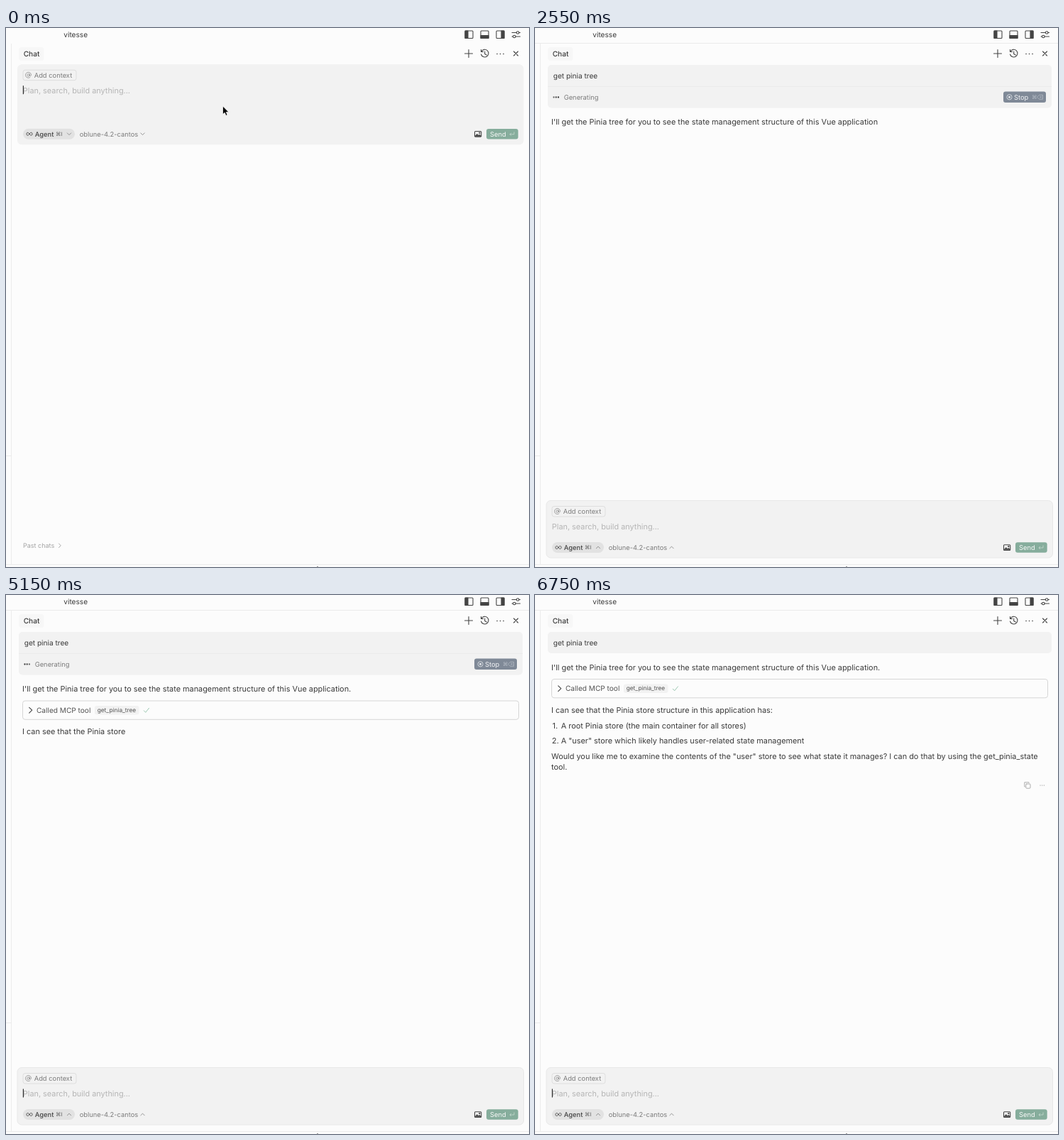
An HTML page for the animation above (7.1 s loop, 737x759 px).

```html
<!DOCTYPE html>
<html lang="en">
<head>
<meta charset="utf-8">
<title>Chat panel</title>
<style>
  html, body { margin: 0; width: 100%; height: 100%; overflow: hidden; background: #fcfcfc; }
  svg { display: block; width: 737px; height: 759px; }
  text { font-family: Inter, Roboto, sans-serif; font-size: 10.89px; fill: #3a3a3a; white-space: pre; text-rendering: geometricPrecision; }
  .mid { font-size: 10.1px; }
  .small { font-size: 9.35px; fill: #7c7c7c; }
  .medium { font-weight: 500; }
  .key { font-family: "DejaVu Sans", sans-serif; font-size: 7.5px; }
  .icon { fill: none; stroke: #444; stroke-width: 1.1; stroke-linecap: round; stroke-linejoin: round; }
  .solid { fill: #444; }
  .line { stroke: #ebebeb; fill: none; }
  .panel { fill: #f2f2f2; }
  .soft { stroke: #8c8c8c; }
</style>
</head>
<body>
<svg viewBox="0 0 737 759">
  <defs>
    <path id="chevron" d="M-2.7-1.3 0 1.4 2.7-1.3"/>
    <path id="return" d="M3-3v3.5H-3m2-2-2 2 2 2"/>
  </defs>
  <rect width="737" height="759" fill="#fcfcfc"/>

  <!-- window chrome -->
  <path class="line" d="M7.5 22V755M0 602.5H7.5M0 755.5H737"/>
  <path id="topLine" class="line" d="M0 21.5H737"/>
  <path d="M438 759h2" stroke="#777" stroke-width="1.5"/>
  <text class="mid" x="81.3" y="13">vitesse</text>
  <g class="icon">
    <rect x="647" y="4" width="11" height="10.5" rx="1"/>
    <path class="solid" d="M647 4h4v10.5h-4z"/>
    <rect x="669" y="4" width="11" height="10.5" rx="1"/>
    <path class="solid" d="M669 10.5h11v4h-11z"/>
    <rect x="691" y="4" width="11" height="10.5" rx="1"/>
    <path class="solid" d="M698 4h4v10.5h-4z"/>
    <path d="M713 6.500h6.500M723 6.500h1.500M713 12h1.500M718 12h6.500"/>
    <circle cx="721.2" cy="6.500" r="1.8"/>
    <circle cx="716.3" cy="12" r="1.8"/>
  </g>
  <rect x="18" y="27" width="35.5" height="19" rx="4" fill="#f7f7f7"/>
  <text class="mid medium" x="24.7" y="39.6">Chat</text>
  <g class="icon">
    <path d="M646.5 36h11M652 30.5v11"/>
    <path d="M670 33a5.3 5.3 0 1 1-.5 4M669.5 30.5V33.5h3M674.7 33v3.5l2.500 1.500"/>
    <path d="M715.5 33l6 6M721.5 33l-6 6"/>
    <path d="M692 36.5h.1M696.5 36.5h.1M701 36.5h.1" stroke-width="1.6"/>
  </g>

  <!-- conversation -->
  <g id="message">
    <rect id="bubble" class="panel" x="18" y="52" width="710" height="60.5" rx="5"/>
    <text class="mid" x="25.7" y="71.2">get pinia tree</text>
    <g id="status">
      <path class="line" d="M18 82.5H728"/>
      <g id="dots" fill="#333">
        <circle cx="26.5" cy="97.5" r="1.15"/>
        <circle cx="29.7" cy="97.5" r="1.15"/>
        <circle cx="32.9" cy="97.5" r="1.15"/>
      </g>
      <text class="small" x="40.7" y="101">Generating</text>
      <rect x="660" y="89.500" width="60" height="15.500" rx="3" fill="#7f8997"/>
      <circle cx="668.5" cy="97.3" r="3.6" fill="none" stroke="#e4e7eb" stroke-width=".8"/>
      <rect x="667.2" y="96" width="2.6" height="2.6" fill="#e4e7eb"/>
      <text class="small" x="675" y="100.9" style="fill:#f3f4f6">Stop</text>
      <text class="key" x="700" y="100" style="fill:#b4bbc5">⌘</text>
      <path d="M710.5 94.3h5v6h-5l-3-3zM711.3 96l2.6 2.6m0-2.6-2.6 2.6" fill="none" stroke="#b4bbc5" stroke-width=".8"/>
    </g>
  </g>
  <g id="reply">
    <text id="intro" x="23" y="136"></text>
    <g id="tool">
      <rect x="23.5" y="149" width="699" height="26.3" rx="3.5" fill="none" stroke="#d6d6d6"/>
      <path class="icon" d="M32.7 158.3l4 3.900-4 3.900"/>
      <text class="mid" x="43" y="165.8" style="fill:#555">Called MCP tool</text>
      <rect x="125" y="156" width="62.5" height="12.5" rx="3" fill="#f2f2f2"/>
      <text x="128.7" y="164.8" style="font-size:8.3px;fill:#555">get_pinia_tree</text>
      <path id="check" d="M194 162.5l2.700 2.800 5-6.300" fill="none" stroke="#9cc8b2" stroke-width="1"/>
    </g>
    <circle id="wait" cx="25" cy="200" r=".7" fill="#aaa"/>
    <g id="lines">
      <text x="23" y="196"></text>
      <text x="36.7" y="218"></text>
      <text x="36.7" y="239"></text>
      <text x="23" y="261"></text>
      <text x="23" y="276.7"></text>
    </g>
    <text id="one" x="24.5" y="218">1.</text>
    <text id="two" x="23.8" y="239">2.</text>
    <g id="actions" class="icon" style="stroke:#a5a5a5;stroke-width:.9">
      <rect x="691.8" y="296.5" width="6.200" height="6.200" rx="1"/>
      <path d="M690.5 300.5h-.7v-6.200h6.200v.7"/>
      <path d="M712 298.5h.1M714.7 298.5h.1M717.4 298.5h.1" stroke="#8c8c8c" style="stroke-width:1.2"/>
    </g>
  </g>

  <!-- composer -->
  <g id="composer">
    <rect id="box" class="panel" x="16" y="0" width="713.5" rx="6"/>
    <rect x="24" y="8" width="75" height="14.5" rx="3" fill="none" stroke="#dedede"/>
    <g class="icon soft" style="stroke-width:.8">
      <circle cx="31.5" cy="15.2" r="1.7"/>
      <path d="M33.2 13.5v2.300q1.500 1.800 2.300-.6a4 4 0 1 0-1.700 3.200"/>
    </g>
    <text class="small" x="39.7" y="18.7">Add context</text>
    <text id="hint" x="23.8" y="40.4" style="fill:#b5b5b5">Plan, search, build anything...</text>
    <text id="draft" x="23.8" y="40.4">get pinia tree</text>
    <rect id="caret" x="24" y="30" width="1.2" height="12" fill="#333"/>
    <g id="toolbar">
      <rect x="24" y="-7.5" width="73" height="15" rx="7.5" fill="#e2e2e2"/>
      <path d="M33 0c-1.500-2.700-4-2.600-4 0s2.500 2.700 4 0 4-2.600 4 0-2.500 2.700-4 0z" class="icon" style="stroke-width:.9"/>
      <text class="small medium" x="40.7" y="3.4" style="fill:#444">Agent</text>
      <text class="key" x="70" y="2.8" style="fill:#666">⌘I</text>
      <text class="small" x="103.7" y="3.4">oblune-4.2-cantos</text>
      <g id="chevrons" class="icon soft" style="stroke-width:.9">
        <use href="#chevron" x="89"/>
        <use href="#chevron" x="192.5"/>
      </g>
      <g class="icon">
        <rect x="660.5" y="-3.7" width="9.2" height="7.600" rx="1"/>
        <path class="solid" d="M661 3l2.800-3 2 2 1.500-1.300 2.200 2.300z" stroke-width=".7"/>
        <circle cx="667.3" cy="-1.5" r=".6"/>
      </g>
      <g id="send">
        <rect x="677" y="-7.2" width="44.7" height="14.4" rx="3" fill="#1c6b48"/>
        <text class="small" x="682" y="3.4" style="fill:#fff">Send</text>
        <use href="#return" x="713" y="0" fill="none" stroke="#fff" stroke-width=".8" opacity=".55"/>
      </g>
    </g>
  </g>
  <g id="past">
    <text x="24" y="732" style="font-size:9px;fill:#a3a3a3">Past chats</text>
    <path class="icon" style="stroke:#a3a3a3;stroke-width:.9" d="M74.5 726l2.700 2.800-2.700 2.800"/>
  </g>

  <path id="pointer" d="M0 0V11.600L2.700 9.200 4.500 13.300 6.500 12.400 4.700 8.400H8.300Z" stroke="#fff" stroke-width=".7"/>
</svg>

<script>
const LOOP = 7100, STEP = 50;
const PASTE = 550, SUBMIT = 750, DONE = 6600;
const el = {};
document.querySelectorAll("[id]").forEach(node => el[node.id] = node);

const intro = "I'll get the Pinia tree for you to see the state management structure of this Vue application";
const answer = [
  "I can see that the Pinia store structure in this application has:",
  "A root Pinia store (the main container for all stores)",
  'A "user" store which likely handles user-related state management',
  'Would you like me to examine the contents of the "user" store to see what state it manages? ' +
    "I can do that by using the get_pinia_state",
  "tool."
].join("\n");
const tokenize = text => text.match(/\s*[^\s_]+_?/g);
const introTokens = tokenize(intro);
const answerTokens = tokenize(answer);

// Piecewise linear value through [time, value] points.
function track(t, points) {
  if (t <= points[0][0]) return points[0][1];
  for (let i = 1; i < points.length; i++) {
    const [t0, v0] = points[i - 1], [t1, v1] = points[i];
    if (t <= t1) return v0 + (v1 - v0) * (t - t0) / (t1 - t0);
  }
  return points[points.length - 1][1];
}
const show = (node, on) => node.style.display = on ? "" : "none";
const move = (node, x, y) => node.setAttribute("transform", `translate(${x} ${y})`);
const take = (tokens, count) => tokens.slice(0, Math.floor(count + 1e-6)).join("");

function drawComposer(t) {
  const sent = t >= SUBMIT, typed = t >= PASTE && !sent;
  move(el.composer, 0, sent ? 665.5 : 51.2);
  move(el.toolbar, 0, sent ? 66 : 98);
  el.box.setAttribute("height", sent ? 80.5 : 113);
  el.box.setAttribute("stroke", sent ? "#e8e8e8" : "none");
  el.chevrons.setAttribute("transform", sent ? "scale(1 -1)" : "");
  el.send.setAttribute("opacity", typed ? 1 : 0.5);
  show(el.hint, !typed);
  show(el.draft, typed);
  show(el.past, !sent);
  show(el.caret, sent ? (t - SUBMIT) % 1000 < 500 : t < 50 || typed);
  el.caret.setAttribute("x", typed ? 24.5 + el.draft.getComputedTextLength() : 23.8);
}

function drawReply(t) {
  const done = t >= DONE;
  show(el.message, t >= SUBMIT);
  show(el.status, !done);
  el.bubble.setAttribute("height", done ? 30 : 60.5);
  [...el.dots.children].forEach((dot, i) =>
    dot.setAttribute("opacity", 0.85 + 0.15 * Math.cos(t / 160 - i * 2)));

  move(el.reply, 0, done ? -30.5 : 0);
  const introCount = track(t, [[2100, 0], [2550, introTokens.length]]);
  el.intro.textContent = take(introTokens, introCount) + (t >= 2600 ? "." : "");
  show(el.tool, t >= 2800);
  el.check.setAttribute("opacity", track(t, [[3400, 0], [3500, 0.45], [3800, 1]]));
  show(el.wait, t >= 3450 && t < 4950);

  const count = track(t, [[4950, 0], [5150, 7], [5800, 26], [6550, 58], [DONE, 60]]);
  const shown = take(answerTokens, count).split("\n");
  [...el.lines.children].forEach((line, i) => line.textContent = shown[i] || "");
  show(el.one, shown.length > 1);
  show(el.two, shown.length > 2);
  show(el.actions, done);
}

function drawPointer(t) {
  const k = track(t, [[950, 0], [1300, 1], [1350, 1.2]]);
  move(el.pointer, 305.5 + 97.5 * k, 110 - 112 * k);
  show(el.pointer, t < 1350);
}

function draw(now) {
  const t = Math.floor(now % LOOP / STEP) * STEP;
  drawComposer(t);
  drawReply(t);
  drawPointer(t);
  show(el.topLine, t >= 2000);
}

let start;
function tick(now) {
  start ??= now;
  draw(Math.max(0, now - start));
  requestAnimationFrame(tick);
}
draw(0);
requestAnimationFrame(tick);
</script>
</body>
</html>
```
